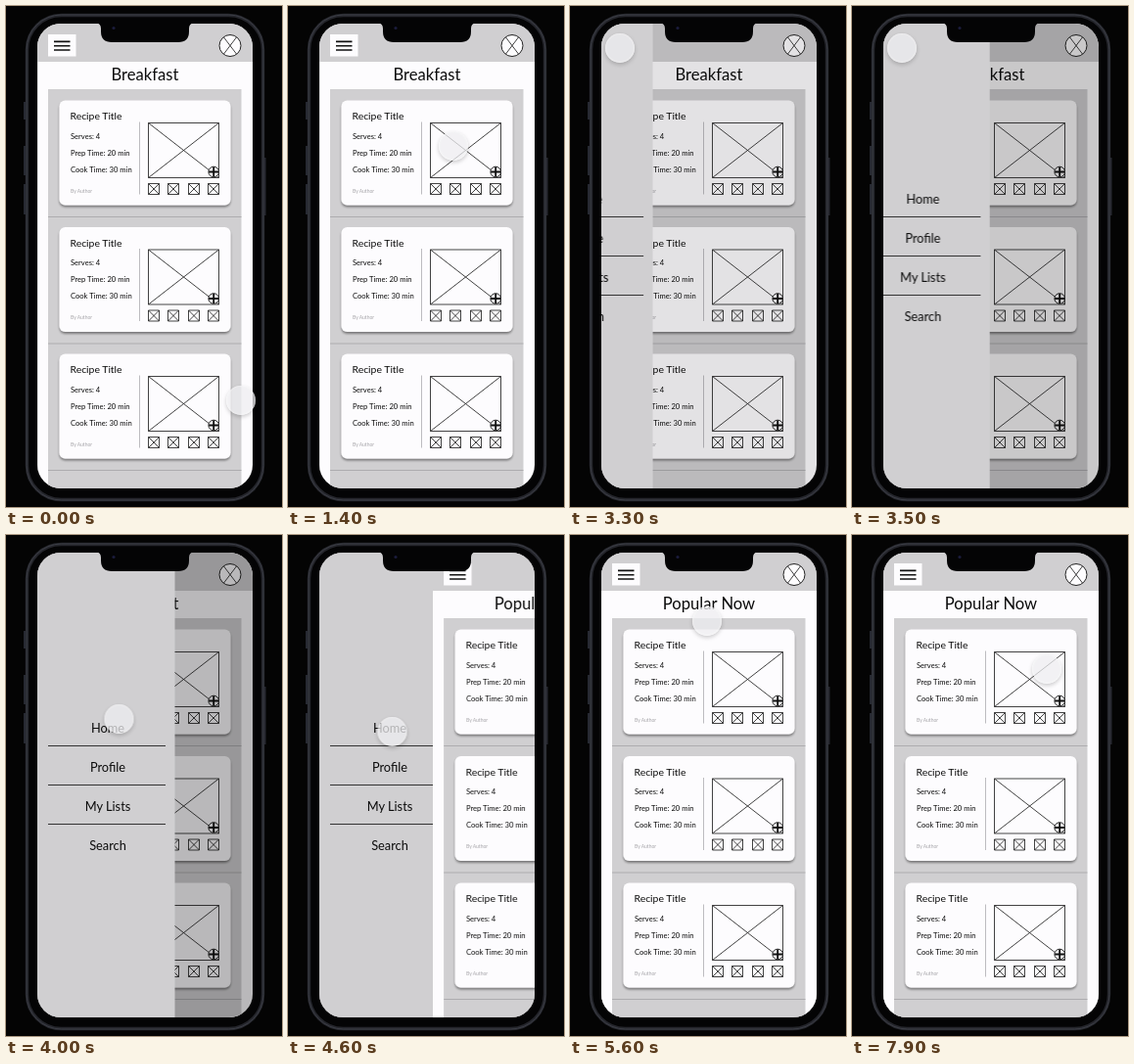
Recreate the animation shown at these times as an HTML page. Size 282x512 px, loop 8000 ms.

```html
<!DOCTYPE html>
<html lang="en">
<head>
<meta charset="utf-8">
<title>Recipe app prototype</title>
<style>
html, body { margin: 0; width: 100%; height: 100%; overflow: hidden; background: #040404; }
svg { position: absolute; left: 0; top: 0; display: block; }
text { font-family: Lato, "Open Sans", sans-serif; fill: #0c0c0c; }
.title { font-size: 16.6px; text-anchor: middle; }
.name { font-size: 10.4px; }
.info { font-size: 7.6px; }
.by { font-size: 5px; fill: #a5a4a8; }
.item { font-size: 12.8px; text-anchor: middle; }
.ink { stroke: #222; stroke-width: .85; fill: none; }

#menu, #dim, #next, #touch { animation: 8s linear infinite; }
#menu { animation-name: menu; }
#dim { animation-name: dim; }
#next { animation-name: next; }
#touch {
  position: absolute; left: -15px; top: -15px; width: 30px; height: 30px;
  border-radius: 50%; background: rgba(238, 237, 240, .75);
  box-shadow: 0 2px 4px rgba(0, 0, 0, .2), inset 0 0 2px rgba(255, 255, 255, .8);
  animation-name: touch; animation-timing-function: ease-in-out;
}
@keyframes menu {
  0%, 36.95% { transform: translateX(-140px); animation-timing-function: ease-in-out; }
  47.1%, 100% { transform: none; }
}
@keyframes dim {
  0%, 36.95% { opacity: 0; animation-timing-function: ease-in-out; }
  47.1%, 100% { opacity: .27; }
}
@keyframes next {
  0%, 52.6% { transform: translateX(220px); animation-timing-function: ease-in-out; }
  62.75%, 100% { transform: none; }
}
@keyframes touch {
  0%, 1.9% { transform: translate(240px, 403px); }
  10%, 23% { transform: translate(169px, 143px); }
  28.75%, 32.75% { transform: translate(72px, 43px); }
  33.75% { transform: translate(54px, 44px); }
  35%, 44.4% { transform: translate(51px, 43px); }
  50% { transform: translate(115.5px, 188px); }
  52.5%, 59% { transform: translate(106.5px, 201px); }
  70%, 91.9% { transform: translate(140px, 88px); }
  98.75%, 100% { transform: translate(199px, 137px); }
}
</style>
</head>
<body>
<svg width="282" height="512" viewBox="0 0 282 512">
  <defs>
    <clipPath id="screen"><rect x="32" y="18" width="220" height="475" rx="24"/></clipPath>
    <filter id="soft" x="-10%" y="-10%" width="120%" height="125%">
      <feDropShadow dx="0" dy="2" stdDeviation="1.1" flood-color="#000" flood-opacity=".42"/>
    </filter>
    <path id="tick" class="ink" d="M145.5 181.5h11v11h-11zl11 11m0-11l-11 11"/>
    <g id="card">
      <rect x="54.5" y="96.5" width="175" height="107" rx="6" fill="#fdfcfe" filter="url(#soft)"/>
      <text class="name" x="65.5" y="116.3">Recipe Title</text>
      <text class="info" x="66" y="135.5">Serves: 4</text>
      <text class="info" x="66" y="152.5">Prep Time: 20 min</text>
      <text class="info" x="66" y="169.5">Cook Time: 30 min</text>
      <text class="by" x="66" y="190.5">By Author</text>
      <path d="M136.5 118.5v74" stroke="#bdbcc0"/>
      <path class="ink" d="M145.5 119.5h72v56h-72zl72 56m0-56l-72 56"/>
      <circle cx="212.2" cy="169.5" r="5.3" fill="#fdfcfe" stroke="#222"/>
      <path d="M212.2 164.5v10M207.2 169.5h10" stroke="#111" stroke-width="1.9"/>
      <use href="#tick"/>
      <use href="#tick" x="20"/>
      <use href="#tick" x="41"/>
      <use href="#tick" x="61"/>
    </g>
    <g id="page">
      <rect x="32" y="18" width="220" height="476" fill="#fdfcfe"/>
      <rect x="32" y="18" width="220" height="39" fill="#d0cfd1"/>
      <rect x="43" y="85" width="197.5" height="409" fill="#d0cfd1"/>
      <rect x="43" y="29" width="28.5" height="22.5" fill="#fdfcfe"/>
      <path d="M49 36.4h16.5M49 40.7h16.5M49 45h16.5" stroke="#111" stroke-width="1.6"/>
      <circle cx="229" cy="40.5" r="11" fill="#fdfcfe" stroke="#222"/>
      <path class="ink" d="M222.4 31.8l13.2 17.4m0-17.4l-13.2 17.4"/>
      <path d="M43 215.5h197.5M43 345h197.5M43 474.5h197.5" stroke="#adacaf"/>
      <use href="#card"/>
      <use href="#card" y="129.5"/>
      <use href="#card" y="259"/>
    </g>
  </defs>

  <rect width="282" height="512" fill="#040404"/>
  <path d="M19 98v18M19 143v30M19 182v31M264.5 155v59" stroke="#282a33" stroke-width="2"/>
  <rect x="21.5" y="9.5" width="241" height="495" rx="35" fill="#040405" stroke="#25262c" stroke-width="3.4"/>
  <rect x="21" y="9" width="242" height="496" rx="35.5" fill="none" stroke="#3b3d45"/>

  <g clip-path="url(#screen)">
    <use href="#page"/>
    <text class="title" x="142" y="76">Breakfast</text>
    <rect id="dim" x="32" y="18" width="220" height="476"/>
    <g id="menu">
      <rect x="32" y="18" width="140.5" height="476" fill="#d0cfd1"/>
      <text class="item" x="104" y="201.5">Home</text>
      <text class="item" x="104" y="241.5">Profile</text>
      <text class="item" x="104" y="281.5">My Lists</text>
      <text class="item" x="104" y="321.5">Search</text>
      <path d="M43 215.5h120M43 255.5h120M43 295.5h120" stroke="#333"/>
    </g>
    <g id="next">
      <use href="#page"/>
      <text class="title" x="142" y="76">Popular Now</text>
    </g>
  </g>
  <path d="M92 17Q97 18 97 23V26Q97 37 108 37H176Q187 37 187 26V23Q187 18 192 17Z" fill="#040405"/>
  <circle cx="110" cy="22.5" r="1.6" fill="#1b1c3c"/>
</svg>
<div id="touch"></div>
</body>
</html>
```
